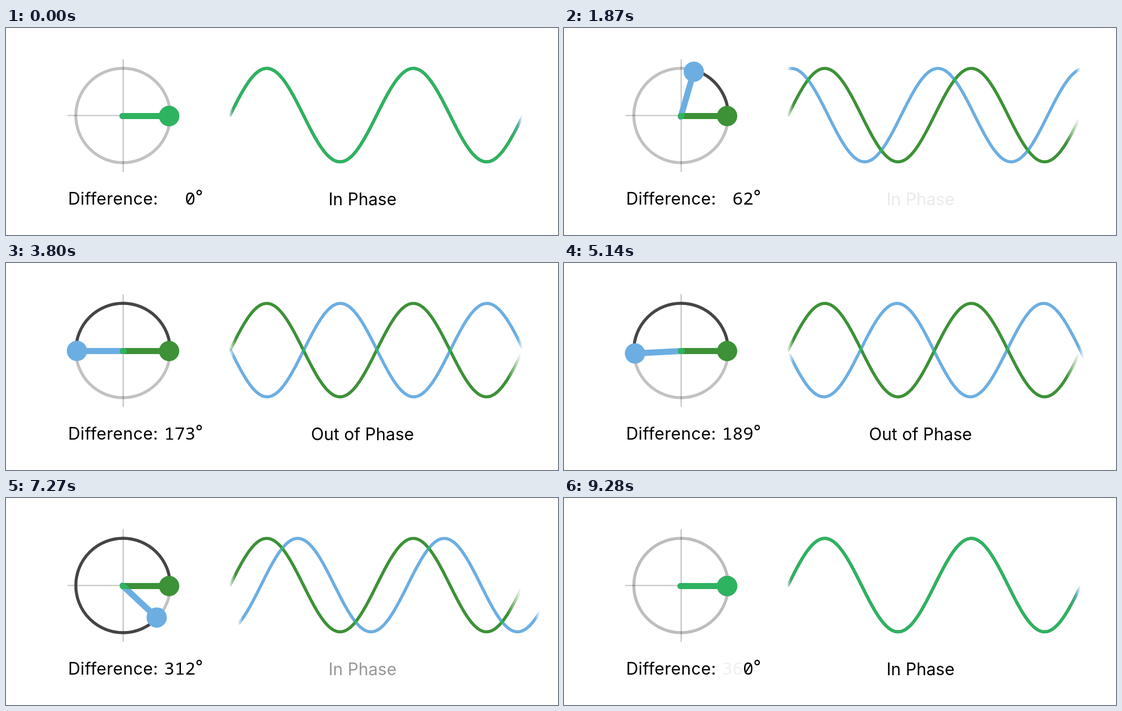
These frames come from a looping animation (1000 px wide and 375 px high, 9310 ms). An HTML page with a canvas:

```html
<!DOCTYPE html>
<html lang="en">
<head>
<meta charset="utf-8">
<title>Phase difference</title>
<style>
  html, body { margin: 0; width: 100%; height: 100%; overflow: hidden; background: #fff; }
  canvas, svg { position: absolute; left: 0; top: 0; width: 1000px; height: 375px; }
  text { font: 30.5px Inter, sans-serif; fill: #000; }
  .label { letter-spacing: .45px; }
  .num { font: 31.7px "Noto Sans Mono", monospace; }
  .mid { text-anchor: middle; }
</style>
</head>
<body>
<canvas id="stage"></canvas>
<svg viewBox="0 0 1000 375">
  <text class="label" x="112.4" y="319.5">Difference:</text>
  <text id="high" class="num" x="324.3" y="319.5" text-anchor="end"></text>
  <text id="unit" class="num" x="324.3" y="319.5">0</text>
  <text class="mid" x="350" y="315.8">°</text>
  <text id="inPhase" class="mid" x="645.8" y="320.5">In Phase</text>
  <text id="outPhase" class="mid" x="645.8" y="320.5">Out of Phase</text>
</svg>
<script>
const LOOP = 9310;
const TURN1_END = 4000, TURN2_START = 4400, TURN2_END = 9100;
const BLUE = [108, 174, 226], GREEN = [61, 145, 55], BOTH = [46, 179, 96];
const CX = 212, CY = 158.5, RING = 85.5, ARM = 83.5;
const LEFT = 406, RIGHT = 935, PERIOD = 265.5, MID = 157.8, AMP = 84.6;

const ramp = (t, from, to) => Math.min(1, Math.max(0, (t - from) / (to - from)));
const rgba = (c, a = 1) => `rgba(${c.join()},${a})`;
const $ = id => document.getElementById(id);

// Ease whose start sharpens with a and whose landing softens with b
const ease = (u, a, b) => 1 - (1 - u ** a) ** b;

// Two half turns with a rest between them
const turn = (a1, b1, a2, b2) => t =>
  180 * ease(ramp(t, 0, TURN1_END), a1, b1) +
  180 * ease(ramp(t, TURN2_START, TURN2_END), a2, b2);

const armAngle = turn(2.45, 3.13, 3.2, 6.18);
const wavePhase = turn(1.87, 2.2, 3, 3.33);
const counter = turn(1.7, 1.31, 2.2, 3.2);
const drift = t => 36.5 * Math.max(0, Math.sin(Math.PI * ramp(t, TURN2_START, TURN2_END))) ** 2.5;

const dpr = window.devicePixelRatio || 1;
function prepare(canvas) {
  canvas.width = 1000 * dpr;
  canvas.height = 375 * dpr;
  const c = canvas.getContext("2d");
  c.scale(dpr, dpr);
  return c;
}
const ctx = prepare($("stage"));
const layer = prepare(document.createElement("canvas"));

function line(x0, y0, x1, y1) {
  ctx.beginPath();
  ctx.moveTo(x0, y0);
  ctx.lineTo(x1, y1);
  ctx.stroke();
}

function arc(degrees) {
  ctx.beginPath();
  ctx.arc(CX, CY, RING, 0, -degrees * Math.PI / 180, true);
  ctx.stroke();
}

function drawArm(c, color, degrees, tail) {
  const a = degrees * Math.PI / 180;
  c.save();
  c.translate(CX + ARM * Math.cos(a), CY + 1 - ARM * Math.sin(a));
  c.rotate(-a);
  // Bar and bob share one path
  c.beginPath();
  c.arc(-ARM - tail, 0, 5.5, Math.PI / 2, Math.PI * 1.5);
  c.lineTo(0, -5.5);
  c.lineTo(0, 5.5);
  c.closePath();
  c.moveTo(18.4, 0);
  c.arc(0, 0, 18.4, 0, Math.PI * 2);
  c.fillStyle = rgba(color);
  c.fill();
  c.restore();
}

function drawWave(c, color, { phase, x0, x1, fadeIn, fadeOut }) {
  const g = c.createLinearGradient(x0 - 2, 0, x1, 0), w = x1 - x0 + 2;
  g.addColorStop(0, rgba(color, 0));
  g.addColorStop(fadeIn / w, rgba(color));
  g.addColorStop(1 - fadeOut / w, rgba(color));
  g.addColorStop(1, rgba(color, 0));
  c.strokeStyle = g;
  c.lineWidth = 5.6;
  c.lineCap = "round";
  c.lineJoin = "round";
  c.beginPath();
  for (let x = x0; x <= x1; x += 1.5) {
    c.lineTo(x, MID - AMP * Math.sin((x - LEFT) / PERIOD * 2 * Math.PI + phase * Math.PI / 180));
  }
  c.stroke();
}

// Paints two shapes and gives their shared area its own colour
function blend(drawBlue, drawGreen) {
  drawBlue(ctx, BLUE);
  drawGreen(ctx, GREEN);
  layer.globalCompositeOperation = "source-over";
  layer.clearRect(0, 0, 1000, 375);
  drawGreen(layer, GREEN);
  layer.globalCompositeOperation = "source-in";
  drawBlue(layer, BOTH);
  ctx.drawImage(layer.canvas, 0, 0, 1000, 375);
}

function drawDial(t) {
  const angle = armAngle(t);
  ctx.strokeStyle = "rgba(0,0,0,.24)";
  ctx.lineWidth = 2.2;
  line(212.3, 57.5, 212.3, 260);
  line(112, 158.5, 313, 158.5);
  ctx.lineWidth = 5.4;
  arc(360);
  if (angle > 0) {
    ctx.strokeStyle = `rgba(70,69,70,${1 - ramp(t, 8150, 9330)})`;
    arc(angle);
  }
  blend((c, color) => drawArm(c, color, angle, 1.3),
        (c, color) => drawArm(c, color, 0, 0.2));
}

function drawWaves(t) {
  const d = drift(t);
  const blue = { phase: wavePhase(t), x0: LEFT + d / 2, x1: RIGHT + 1 + d, fadeIn: 9, fadeOut: 9 };
  const green = { phase: 0, x0: LEFT, x1: RIGHT - 2, fadeIn: 12, fadeOut: 23 };
  blend((c, color) => drawWave(c, color, blue),
        (c, color) => drawWave(c, color, green));
}

function drawText(t) {
  const n = Math.floor(counter(t) + 0.2);
  $("high").textContent = n >= 10 ? Math.floor(n / 10) : "";
  $("unit").textContent = n % 10;
  $("high").style.opacity = 1 - ramp(t, 8900, 9305);
  $("inPhase").style.opacity = 1 - ramp(t, 720, 1970) + ramp(t, 6770, 8020);
  $("outPhase").style.opacity = ramp(t, 2300, 3530) - ramp(t, 5200, 6450);
}

const start = performance.now();
function frame() {
  const t = (performance.now() - start) % LOOP;
  ctx.clearRect(0, 0, 1000, 375);
  drawDial(t);
  drawWaves(t);
  drawText(t);
  requestAnimationFrame(frame);
}
frame();
</script>
</body>
</html>
```
